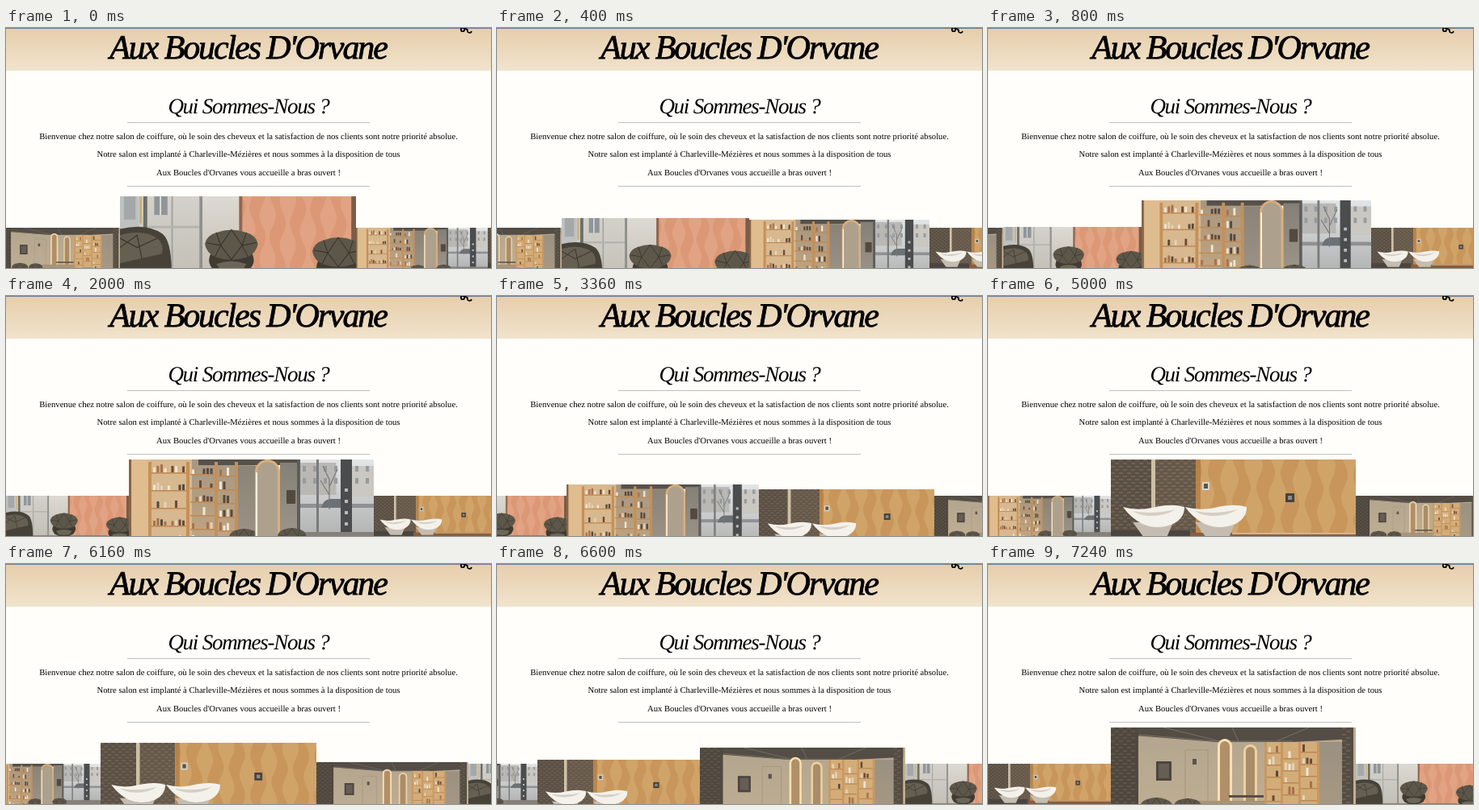
Write an HTML page with a canvas that moves like this. It is 600x298 px and loops after 8 s.

```html
<!DOCTYPE html>
<html lang="fr">
<head>
<meta charset="utf-8">
<title>Salon de coiffure</title>
<style>
html, body { margin: 0; width: 100%; height: 100%; overflow: hidden; background: #fffefa; }
canvas, svg { position: absolute; left: 0; top: 0; width: 600px; height: 298px; display: block; }
text { text-anchor: middle; fill: #000; font-family: "Liberation Serif", "Times New Roman", serif; text-rendering: geometricPrecision; }
.title { font-size: 42px; font-style: italic; letter-spacing: -2.1px; stroke: #000; stroke-width: 0.8px; }
.head { font-size: 27px; font-style: italic; letter-spacing: -1.25px; }
.body { font-size: 10.667px; }
</style>
</head>
<body>
<canvas id="stage" width="600" height="298"></canvas>
<svg viewBox="0 0 600 298">
  <defs>
    <linearGradient id="band" x1="0" y1="0" x2="0" y2="1">
      <stop offset="0" stop-color="#e6ceab"/>
      <stop offset="1" stop-color="#f1e3cd"/>
    </linearGradient>
  </defs>
  <rect width="600" height="53" fill="url(#band)"/>
  <rect width="600" height="1" fill="#6d7f93"/>
  <g fill="none" stroke="#000" stroke-width="1.8">
    <circle cx="565" cy="2" r="2.2"/>
    <path d="M567 0L571 2.5A2.4 2.4 0 0 0 576 4"/>
  </g>
  <text class="title" x="299.5" y="38">Aux Boucles D'Orvane</text>
  <text class="head" x="300" y="105.5">Qui Sommes-Nous ?</text>
  <path d="M150 117.5H450M150 196.5H450" stroke="#bec1c0"/>
  <text class="body" x="300" y="138">Bienvenue chez notre salon de coiffure, où le soin des cheveux et la satisfaction de nos clients sont notre priorité absolue.</text>
  <text class="body" x="300" y="160.3">Notre salon est implanté à Charleville-Mézières et nous sommes à la disposition de tous</text>
  <text class="body" x="300" y="183">Aux Boucles d'Orvanes vous accueille a bras ouvert !</text>
</svg>
<script>
const c = document.getElementById('stage').getContext('2d');
const FULL = 303, SMALL = 152, TALL = 112;

const rand = n => { const v = Math.sin(n * 127.1 + 11.7) * 43758.5453; return v - Math.floor(v); };

function box(color, x, y, w, h) {
  c.fillStyle = color;
  c.fillRect(x, y, w, h);
}

function shape(color, path) {
  c.fillStyle = color;
  c.fill(new Path2D(path));
}

function line(color, width, path) {
  c.strokeStyle = color;
  c.lineWidth = width;
  c.stroke(new Path2D(path));
}

function shade(x, y, w, h, top, bottom) {
  const g = c.createLinearGradient(0, y, 0, y + h);
  g.addColorStop(0, top);
  g.addColorStop(1, bottom);
  box(g, x, y, w, h);
}

// Wallpaper made of wavy vertical bands
function waves(x, w, base, light, step) {
  box(base, x, 0, w, TALL);
  c.fillStyle = light;
  for (let i = 0; i * step < w; i += 2) {
    const left = x + i * step;
    c.beginPath();
    for (let y = 0; y <= TALL; y += 4) c.lineTo(left + 4 + 4 * Math.sin(y / 9 + i), y);
    for (let y = TALL; y >= 0; y -= 4) c.lineTo(left + step + 4 - 4 * Math.sin(y / 9 + i), y);
    c.fill();
  }
}

function weave(x, w, base, light) {
  box(base, x, 0, w, TALL);
  for (let y = 0, r = 0; y < TALL; y += 4, r++)
    for (let i = (r % 2) * 5; i < w - 4; i += 10) box(light, x + i, y, 5, 2);
}

function bottles(x, y, w, seed) {
  const tones = ['#6b4a38', '#efe5d4', '#55493f', '#a9714c', '#e2d3ba'];
  for (let i = 0; i < w - 3; i += 4.5) {
    const n = seed + i;
    if (rand(n) < 0.4) continue;
    const h = 5 + 5 * rand(n + 3);
    box(tones[Math.floor(rand(n + 7) * 5)], x + i, y - h, 3, h);
  }
}

function shelf(x, w, top, gap, seed) {
  for (let y = top, k = 0; y < TALL; y += gap, k++) {
    bottles(x + 2, y, w - 4, seed + k * 31);
    box('#bf8a55', x, y, w, 1.6);
  }
}

function arch(x, y, w, rim, inside) {
  const r = w / 2, q = r - 3;
  shape(rim, `M${x} ${TALL}V${y + r}A${r} ${r} 0 0 1 ${x + w} ${y + r}V${TALL}Z`);
  shape(inside, `M${x + 3} ${TALL}V${y + r}A${q} ${q} 0 0 1 ${x + w - 3} ${y + r}V${TALL}Z`);
}

function chair(x, y, s) {
  c.save();
  c.translate(x, y);
  c.scale(s, s);
  shape('#3f3a32', 'M8 34Q2 46 12 56Q37 70 62 56Q72 46 66 34Z');
  shape('#5d574a', 'M0 20Q2 8 16 4Q37 -4 58 4Q72 8 74 20Q72 32 60 38Q37 46 14 38Q2 32 0 20Z');
  shape('#6c6657', 'M16 48Q37 40 58 48L52 57Q37 62 22 57Z');
  line('#38332b', 1.2, 'M37 0L22 22L37 42L52 22ZM2 18L22 22L14 38M72 18L52 22L60 38M16 4L22 22M58 4L52 22');
  c.restore();
}

function street(x, w) {
  shade(x, 0, w, TALL, '#e2e5e7', '#a9aaa9');
  box('#bab8b4', x, 4, w * 0.5, 40);
  box('#cbc7c1', x + w * 0.58, 8, w * 0.42, 38);
  for (let i = 5; i < w - 5; i += 13)
    for (let y = 8; y < 38; y += 15) box('#969ba0', x + i, y, 4, 7);
  box('#8f9192', x, 55, w, 5);
  shape('#6c7176', `M${x + w * 0.3} 60q3 -11 12 -11h12q8 1 11 11z`);
}

function chairsRoom() {
  shade(0, 0, 153, TALL, '#d3d1ca', '#c2beb5');
  box('#bfc1c1', 0, 0, 24, TALL);
  box('#a5a8a9', 5, 0, 15, 30);
  box('#cbb071', 25, 0, 3, 35);
  box('#6c6c69', 30, 0, 5, TALL);
  box('#8f9598', 44, 0, 17, 24);
  box('#dddcd8', 51, 0, 2, 24);
  box('#a3a39f', 66, 0, 2, TALL);
  box('#b5b3ad', 36, 38, 66, 3);
  box('#8f908d', 102, 0, 4, TALL);
  shade(106, 0, 47, TALL, '#dddad3', '#c2bbb0');
  waves(153, 150, '#dc9876', '#e1a384', 13);
  box('#8f6751', 153, 0, 4, TALL);
  box('#7c5c48', 297, 0, 6, TALL);
  box('#8d7562', 60, 98, 190, 14);
  shape('#474238', 'M0 42Q34 34 54 48Q68 58 66 112H0Z');
  shape('#655f52', 'M0 50Q30 42 48 54Q57 62 54 74L0 86Z');
  line('#38332b', 1.2, 'M0 66L22 50L28 80M48 54L22 66L0 54');
  chair(109, 43, 0.92);
  chair(247, 53, 0.9);
}

function shelvesRoom() {
  box('#d8b88e', 0, 0, 160, TALL);
  box('#8a6442', 0, 0, 3, TALL);
  box('#dfbd8f', 4, 0, 20, TALL);
  shade(78, 0, 78, TALL, '#a79781', '#c3a680');
  box('#56514b', 86, 0, 124, 7);
  shelf(28, 44, 16, 22, 2);
  shelf(76, 30, 18, 17, 51);
  shelf(110, 22, 20, 17, 83);
  for (const x of [24, 71, 106, 131]) box('#c68f58', x, 3, 4, TALL);
  shade(135, 8, 24, TALL, '#8b8377', '#a1978a');
  chair(124, 86, 0.5);
  arch(156, 0, 31, '#dcae79', '#ada18e');
  box('#fff0d3', 157, 16, 2, TALL);
  shade(187, 4, 23, TALL, '#858077', '#a0998d');
  box('#54493f', 195, 38, 11, 17);
  street(210, 93);
  box('#5d5e5c', 208, 0, 4, TALL);
  box('#7a7c7c', 232, 0, 3, TALL);
  box('#4a4c4d', 262, 0, 14, TALL);
  for (let y = 36; y < 80; y += 14) box('#b9bbba', 267, y, 4, 4);
  line('#7b7974', 1.2, 'M248 62V25L240 8M248 34L258 12M248 44L237 26');
  box('#85817a', 187, 90, 116, 22);
  chair(184, 85, 0.48);
}

function sink(x, y) {
  c.save();
  c.translate(x, y);
  shape('#c5bdb1', 'M12 20H62L54 39H26Z');
  shape('#f4f1eb', 'M0 1Q18 6 36 2Q60 -4 76 1Q76 15 62 22Q42 30 24 22Q10 15 0 1Z');
  shape('#d4cec5', 'M12 6Q36 11 65 4Q50 13 32 12Q19 11 12 6Z');
  c.restore();
}

function sinksRoom() {
  weave(0, 50, '#5b5044', '#6e6255');
  box('#cfc0a5', 50, 0, 5, TALL);
  weave(55, 50, '#66594b', '#786957');
  waves(105, 198, '#c8965a', '#d0a369', 15);
  shade(105, 0, 6, TALL, '#b68145', '#bd8a50');
  box('#d9d4c9', 113, 28, 9, 10);
  box('#59544c', 115, 30, 5, 6);
  box('#424240', 216, 42, 11, 11);
  box('#8b8c8a', 219, 45, 5, 5);
  box('#895d3d', 98, 91, 205, 21);
  box('#d6b491', 150, 91, 153, 2);
  box('#4b4540', 0, 88, 98, 24);
  sink(15, 58);
  sink(92, 58);
}

function hallRoom() {
  shade(0, 0, FULL, TALL, '#b3a58e', '#bfae93');
  shape('#534d46', 'M30 0H303V14L225 18H130L30 10Z');
  line('#777065', 1, 'M65 0L135 17M150 0L158 17M245 0L205 17M35 9L130 17H225');
  weave(0, 34, '#4f483f', '#5e564b');
  box('#4a453f', 56, 42, 19, 24);
  box('#665d53', 59, 45, 13, 18);
  line('#a39580', 1, 'M92 28H120V112M92 28V112');
  box('#5a554d', 101, 39, 5, 7);
  arch(132, 14, 18, '#fbe0b2', '#b08f69');
  arch(164, 21, 17, '#efd0a0', '#a98d69');
  box('#d3ad79', 190, 18, 68, TALL);
  shelf(193, 17, 31, 15, 6);
  shelf(213, 19, 38, 15, 45);
  shelf(235, 20, 30, 15, 91);
  for (const x of [190, 210, 232, 255]) box('#c99760', x, 18, 3, TALL);
  shade(258, 18, 32, TALL, '#9b9182', '#ab9a82');
  weave(286, 14, '#544d43', '#6a5f50');
  box('#c5ae8e', 300, 0, 3, TALL);
  box('#aa9477', 106, 91, 84, 21);
  box('#5a4f45', 146, 84, 43, 3);
  chair(36, 87, 0.55);
  chair(78, 88, 0.46);
}

const rooms = [chairsRoom, shelvesRoom, sinksRoom, hallRoom];

function slide(index, x, focus) {
  const w = SMALL + (FULL - SMALL) * focus;
  const left = Math.round(x), right = Math.round(x + w);
  const y = Math.round(248 - 45 * focus * focus);
  const s = (right - left) / FULL;
  c.save();
  c.beginPath();
  c.rect(left, y, right - left, 298 - y);
  c.clip();
  c.translate(left, y);
  c.scale(s, s);
  rooms[(index + 4) % 4]();
  c.restore();
  return x + w;
}

function draw(t) {
  const phase = t + 72;
  const first = Math.floor(phase / 3000);
  const move = Math.min(1, (phase % 3000) / 1000);
  c.fillStyle = '#fffefa';
  c.fillRect(0, 0, 600, 298);
  let x = -SMALL * move;
  for (let i = first - 1; x < 600; i++)
    x = slide(i, x, Math.max(0, 1 - Math.abs(i - first - move)));
}

const start = performance.now();
function tick() {
  draw((performance.now() - start) % 8000);
  requestAnimationFrame(tick);
}
tick();
</script>
</body>
</html>
```
